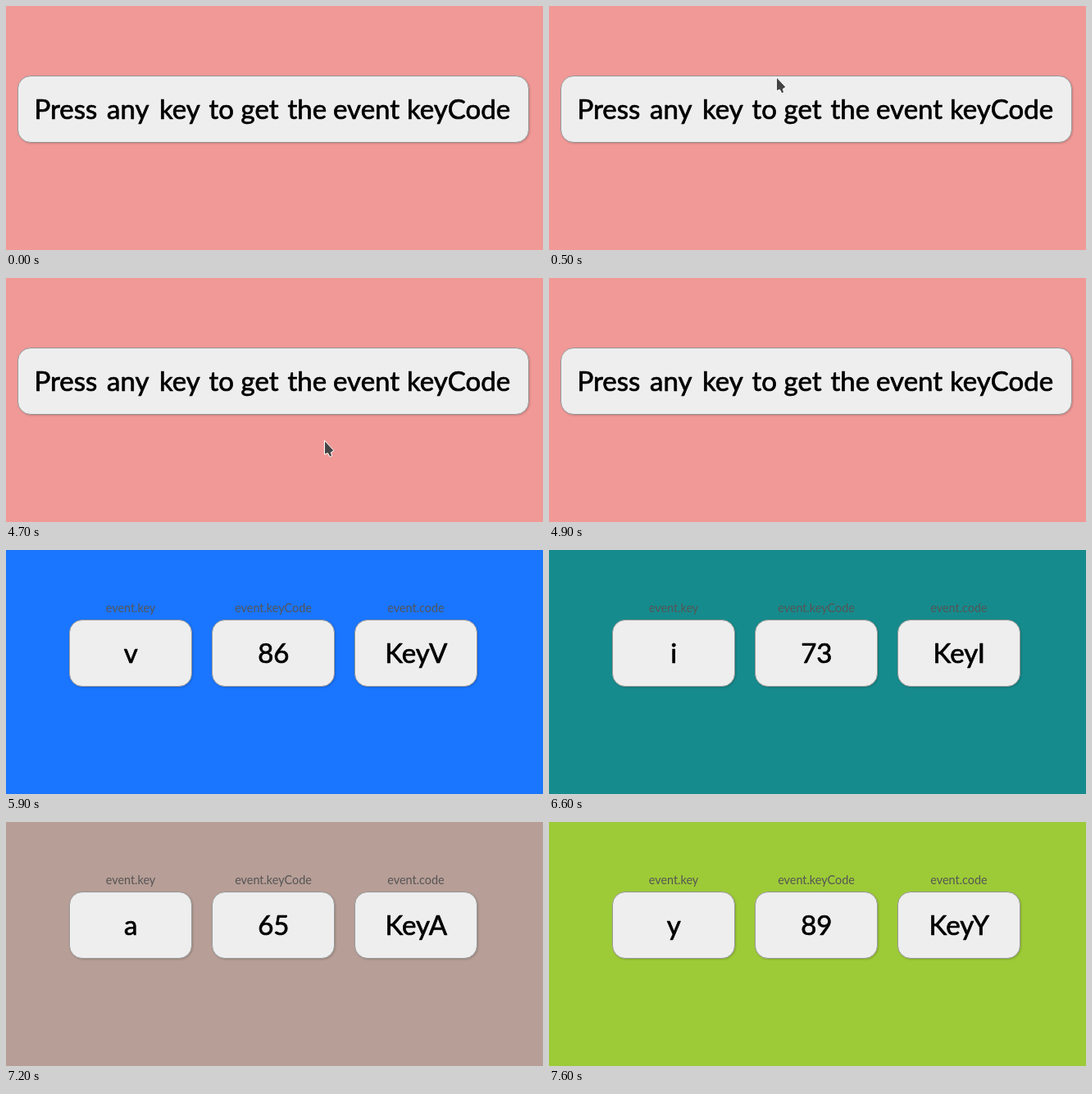
An HTML page that plays this animation: 655x298 px, repeating every 8000 ms.

```html
<!DOCTYPE html>
<html lang="en">
<head>
<meta charset="utf-8">
<title>Event keyCode</title>
<style>
  html, body { margin: 0; width: 100%; height: 100%; overflow: hidden; }
  svg { display: block; width: 655px; height: 298px; font-family: Lato, "Open Sans", sans-serif; }
  .box { fill: #eee; stroke: #999; filter: drop-shadow(1px 1px 1px rgba(0, 0, 0, .18)); }
  .big { font-size: 33px; fill: #000; stroke: #000; stroke-width: .7px; stroke-linejoin: round; }
  .label { font-size: 14.4px; fill: #555; }
  .mid { text-anchor: middle; }
</style>
</head>
<body>
<svg viewBox="0 0 655 298">
  <rect id="bg" width="655" height="298"/>
  <g id="intro">
    <rect class="box" x="14.5" y="85.5" width="623" height="81" rx="15.5"/>
    <text class="big" id="prompt" y="138"></text>
    <path id="cursor" d="M0 0V17L4 15.3L6.5 20L9.2 18.7L7.8 14.6L11.5 12.3Z"
      fill="#444" stroke="#fff" stroke-linejoin="round"/>
  </g>
  <g id="keys"></g>
</svg>
<script>
const NS = 'http://www.w3.org/2000/svg';
const LOOP = 8000, KEYS_AT = 5900;
const $ = id => document.getElementById(id);

function add(parent, tag, attrs, text = '') {
  const el = document.createElementNS(NS, tag);
  for (const k in attrs) el.setAttribute(k, attrs[k]);
  el.textContent = text;
  return parent.appendChild(el);
}

const wordX = [34.5, 123, 187, 247.5, 286.5, 343.5, 399, 489];
'Press any key to get the event keyCode'.split(' ').forEach((word, i) => {
  if (i) $('prompt').append(' ');
  add($('prompt'), 'tspan', { x: wordX[i] }, word);
});

const values = ['event.key', 'event.keyCode', 'event.code'].map((name, i) => {
  const x = 77.5 + 174 * i, cx = x + 74.5, g = $('keys');
  add(g, 'text', { class: 'label mid', x: cx, y: 76 }, name);
  add(g, 'rect', { class: 'box', x, y: 85.5, width: 149, height: 81, rx: 15.5 });
  return add(g, 'text', { class: 'big mid', x: cx + .3, y: 138 });
});

const presses = [
  { at: 5900, key: 'v', color: '#1a75ff' },
  { at: 6600, key: 'i', color: '#168b8d' },
  { at: 6900, key: 'j', color: '#8c88a0' },
  { at: 7200, key: 'a', color: '#b79e96' },
  { at: 7600, key: 'y', color: '#9dcb37' }
];

// Pointer tip, sampled every 100 ms; null while it is off the page.
function pointer(t) {
  const step = Math.floor(t / 100) * 100;
  if (step < 400 || step >= 4900) return null;
  if (step >= 4800) return [552, 160.5];
  if (step >= 4700) return [388.5, 198.5];
  const p = Math.min(1, (step - 400) / 500);
  const e = 1 - (1 - p) ** 2;
  return [215.5 + 172 * e, 19.5 + 187 * e];
}

function draw(t) {
  const typing = t >= KEYS_AT;
  $('intro').style.display = typing ? 'none' : '';
  $('keys').style.display = typing ? '' : 'none';
  if (typing) {
    const { key, color } = presses.filter(p => p.at <= t).pop();
    const upper = key.toUpperCase();
    $('bg').setAttribute('fill', color);
    [key, upper.charCodeAt(0), 'Key' + upper].forEach((v, i) => values[i].textContent = v);
  } else {
    const tip = pointer(t);
    $('bg').setAttribute('fill', '#f09997');
    $('cursor').style.display = tip ? '' : 'none';
    if (tip) $('cursor').setAttribute('transform', `translate(${tip})`);
  }
}

const start = performance.now();
function tick() {
  draw((performance.now() - start) % LOOP);
  requestAnimationFrame(tick);
}
tick();
</script>
</body>
</html>
```
